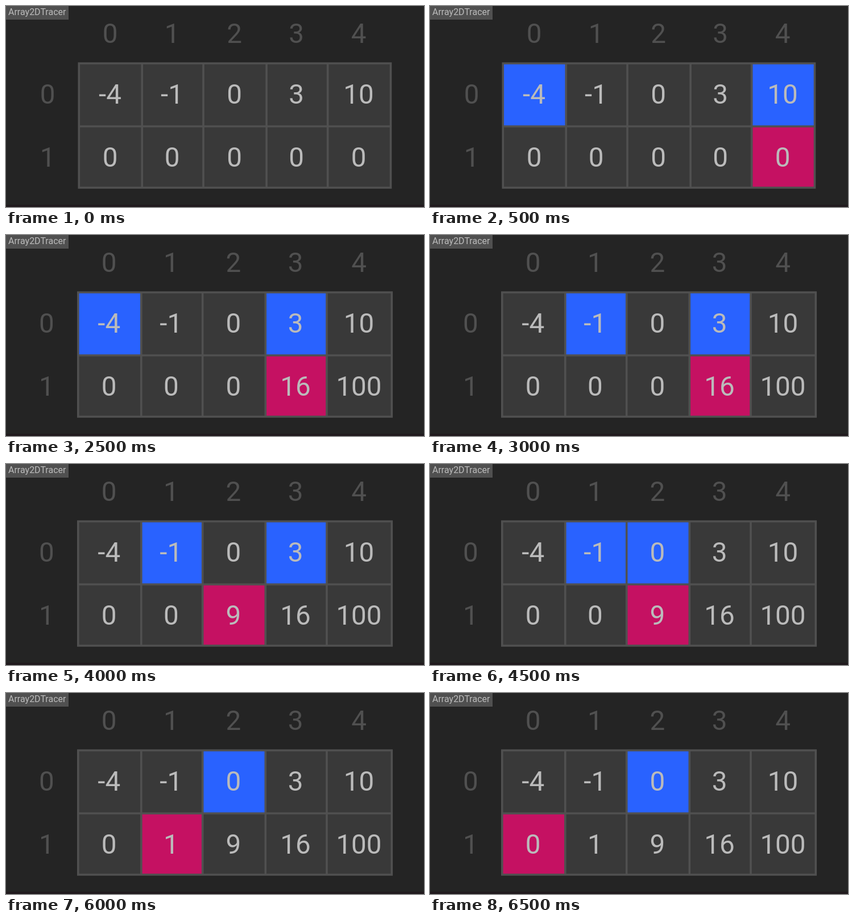
Animation, 735 px wide and 354 px high, one loop 7000 ms. Source, as an HTML page:

```html
<!DOCTYPE html>
<html lang="en">
<head>
<meta charset="utf-8">
<title>Array2DTracer</title>
<style>
html, body { margin: 0; width: 100%; height: 100%; overflow: hidden; background: #242424; }
svg { display: block; width: 735px; height: 354px; font-family: Roboto, sans-serif; }
.value, .index { font-size: 47.6px; text-anchor: middle; }
.value { fill: #bbb; }
.index { fill: #505050; }
.grid { fill: none; stroke: #505050; stroke-width: 3.6; stroke-linecap: square; }
.label { font-size: 16px; fill: #bbb; }
</style>
</head>
<body>
<svg viewBox="0 0 735 354">
  <rect y="350" width="735" height="4" fill="#211b1e"/>
  <rect width="110" height="24" fill="#505050"/>
  <text class="label" x="4" y="16">Array2DTracer</text>
  <g id="table"></g>
</svg>
<script>
const STEP = 500;
const BASE = '#393939', BLUE = '#2962ff', PINK = '#c51162';
const numbers = [-4, -1, 0, 3, 10];
const rowLines = [101, 212, 320];
const baselines = [172, 282.6];
const headerBaseline = 65;

// The table widens once a three-digit value appears.
const narrow = {
  lines: [128.3, 239.2, 347, 458.1, 565.7, 676.5],
  centers: [183, 292, 401.5, 510.5, 620],
  indexX: 73
};
const wide = {
  lines: [126.8, 237.8, 345.7, 456.3, 564, 678.3],
  centers: [181.2, 290.3, 399.8, 509, 620.5],
  indexX: 71.4
};

// Each step: selected columns, patched column, squares written so far.
const steps = [
  [[], -1, 0],
  [[0, 4], 4, 0],
  [[0, 4], 4, 1],
  [[0, 3], 4, 1],
  [[0, 3], 3, 1],
  [[0, 3], 3, 2],
  [[1, 3], 3, 2],
  [[1, 3], 2, 2],
  [[1, 3], 2, 3],
  [[1, 2], 2, 3],
  [[1, 2], 1, 3],
  [[1, 2], 1, 4],
  [[2], 1, 4],
  [[2], 0, 4]
];
const squares = numbers.map(n => n * n).sort((a, b) => a - b);

const text = (kind, x, y, content) =>
  `<text class="${kind}" x="${x}" y="${y}">${content}</text>`;

function draw([selected, patched, written]) {
  const { lines, centers, indexX } = written ? wide : narrow;
  const left = lines[0], right = lines[5];
  const results = squares.map((s, i) => i >= 5 - written ? s : 0);
  let cells = '', labels = '';

  [numbers, results].forEach((row, r) => {
    labels += text('index', indexX, baselines[r], r);
    row.forEach((value, c) => {
      const fill = r === 0 && selected.includes(c) ? BLUE
        : r === 1 && c === patched ? PINK : BASE;
      cells += `<rect x="${lines[c]}" y="${rowLines[r]}" width="${lines[c + 1] - lines[c]}"
        height="${rowLines[r + 1] - rowLines[r]}" fill="${fill}"/>`;
      labels += text('value', centers[c], baselines[r], value);
    });
  });
  centers.forEach((x, c) => labels += text('index', x, headerBaseline, c));

  const grid = lines.map(x => `M${x} ${rowLines[0]}V${rowLines[2]}`).join('')
    + rowLines.map(y => `M${left} ${y}H${right}`).join('');
  document.getElementById('table').innerHTML =
    cells + `<path class="grid" d="${grid}"/>` + labels;
}

const start = performance.now();
let shown = -1;
function tick() {
  const elapsed = performance.now() - start;
  const step = Math.floor(elapsed / STEP) % steps.length;
  if (step !== shown) draw(steps[shown = step]);
  requestAnimationFrame(tick);
}
tick();
</script>
</body>
</html>
```
